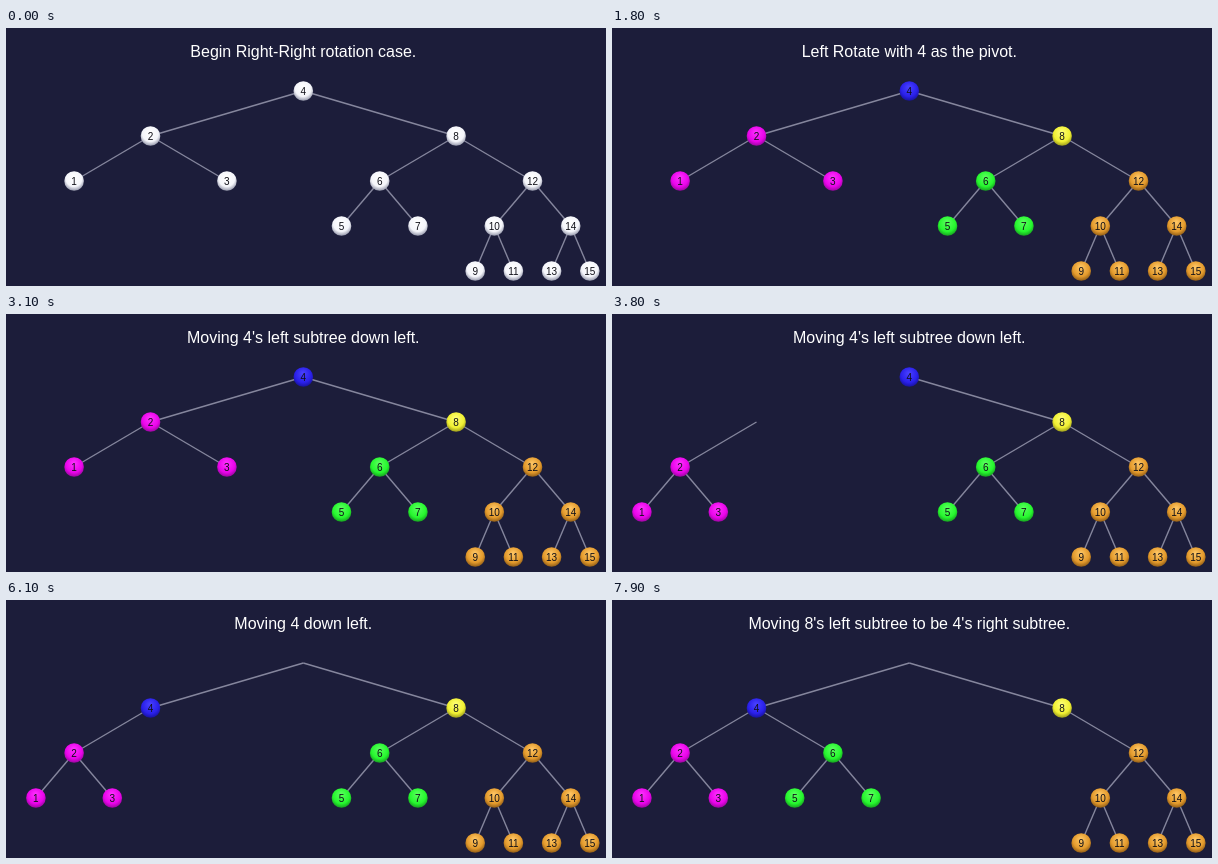
These frames come from a looping animation (600 px wide and 258 px high, 8 s). An HTML page with a canvas:

```html
<!DOCTYPE html>
<html lang="en">
<head>
<meta charset="utf-8">
<title>Tree rotation</title>
<style>
html, body { margin: 0; width: 100%; height: 100%; overflow: hidden; background: #1c1d3a; }
canvas { display: block; width: 600px; height: 258px; }
</style>
</head>
<body>
<canvas id="stage"></canvas>
<script>
const W = 600, H = 258, LOOP = 8000, RADIUS = 9.8;
const canvas = document.getElementById('stage');
const ctx = canvas.getContext('2d');
const ratio = window.devicePixelRatio || 1;
canvas.width = W * ratio;
canvas.height = H * ratio;
ctx.scale(ratio, ratio);

const captions = [
  [0, 'Begin Right-Right rotation case.'],
  [900, 'Left Rotate with 4 as the pivot.'],
  [2700, "Moving 4's left subtree down left."],
  [4600, 'Moving 4 down left.'],
  [6400, "Moving 8's left subtree to be 4's right subtree."]
];
const COLOR_AT = 1800;

// Ball shades: highlight, body, rim
const shades = {
  white: ['#ffffff', '#f4f5fa', '#8f92a6'],
  blue: ['#4a42ff', '#2a20ea', '#17129a'],
  magenta: ['#ff32ff', '#e904ea', '#98069c'],
  yellow: ['#ffff78', '#f0f032', '#98981c'],
  green: ['#5cff60', '#26f72e', '#169c20'],
  orange: ['#ffc766', '#e39a2c', '#8d5a16']
};

// Each group: colour, time of its move, and nodes as [label, slot, new slot].
// Slots are numbered level by level, so the parent of s is floor(s / 2).
const groups = [
  { color: 'blue', moveAt: 5500, nodes: [[4, 1, 2]] },
  { color: 'magenta', moveAt: 3600, nodes: [[2, 2, 4], [1, 4, 8], [3, 5, 9]] },
  { color: 'yellow', moveAt: Infinity, nodes: [[8, 3]] },
  { color: 'green', moveAt: 7300, nodes: [[6, 6, 5], [5, 12, 10], [7, 13, 11]] },
  { color: 'orange', moveAt: Infinity,
    nodes: [[12, 7], [10, 14], [14, 15], [9, 28], [11, 29], [13, 30], [15, 31]] }
];

function slotPoint(slot) {
  const depth = Math.floor(Math.log2(slot));
  const row = 2 ** depth;
  return {
    x: 297.3 + 305.6 * ((2 * (slot - row) + 1) / row - 1),
    y: 63 + 45 * depth
  };
}

function drawEdge(slot) {
  if (slot === 1) return;
  const a = slotPoint(slot >> 1), b = slotPoint(slot);
  ctx.beginPath();
  ctx.moveTo(a.x, a.y);
  ctx.lineTo(b.x, b.y);
  ctx.stroke();
}

function drawBall({ slot, label, color }) {
  const { x, y } = slotPoint(slot);
  const [light, body, rim] = shades[color];
  const fill = ctx.createRadialGradient(x - 0.5, y - 4, 0, x, y - 1.8, RADIUS + 2);
  fill.addColorStop(0, light);
  fill.addColorStop(0.68, body);
  fill.addColorStop(1, rim);
  ctx.fillStyle = fill;
  ctx.beginPath();
  ctx.arc(x, y, RADIUS, 0, Math.PI * 2);
  ctx.fill();
  ctx.fillStyle = '#101018';
  ctx.fillText(label, x, y + 3.5);
}

function draw(t) {
  ctx.fillStyle = '#1c1d3a';
  ctx.fillRect(0, 0, W, H);

  const nodes = groups.flatMap(g => g.nodes.map(([label, from, to]) => ({
    label,
    slot: t >= g.moveAt ? to : from,
    color: t >= COLOR_AT ? g.color : 'white'
  })));

  ctx.strokeStyle = '#85869d';
  ctx.lineWidth = 1.4;
  nodes.forEach(n => drawEdge(n.slot));

  ctx.textAlign = 'center';
  ctx.font = '10px "Liberation Sans", Arial, sans-serif';
  nodes.forEach(drawBall);

  ctx.fillStyle = '#ffffff';
  ctx.font = '16px "Liberation Sans", Arial, sans-serif';
  ctx.fillText(captions.filter(c => t >= c[0]).pop()[1], 297.3, 28.5);
}

const start = performance.now();
function tick() {
  draw((performance.now() - start) % LOOP);
  requestAnimationFrame(tick);
}
tick();
</script>
</body>
</html>
```
